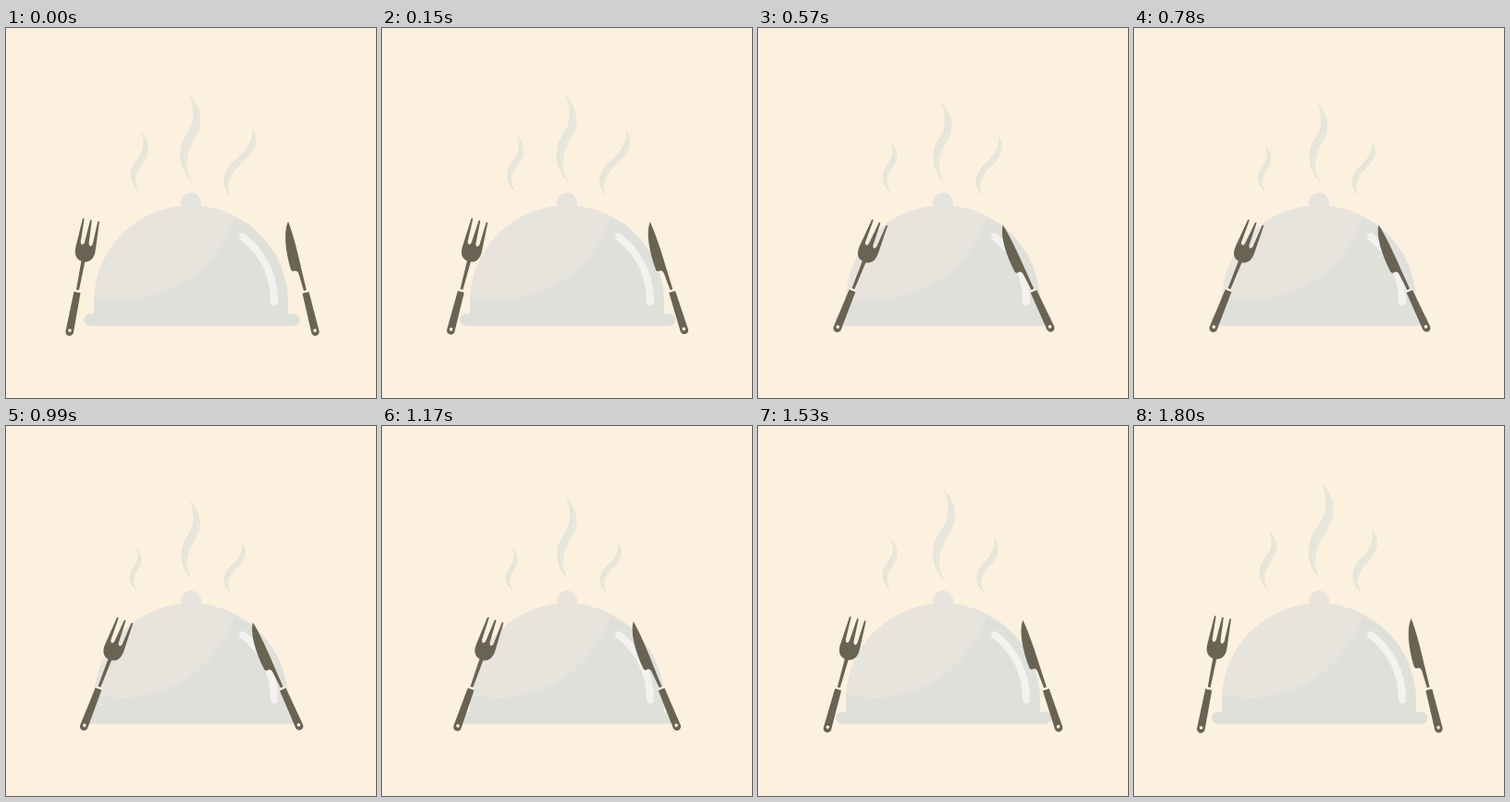
Recreate the animation shown at these times as an HTML page with a canvas. Size 400 by 400 pixels, loop 1860 ms.

```html
<!DOCTYPE html>
<html lang="en">
<head>
<meta charset="utf-8">
<title>Served dish</title>
<style>
  html, body { margin: 0; width: 100%; height: 100%; overflow: hidden; background: #fcf0df; }
  canvas { display: block; width: 400px; height: 400px; }
</style>
</head>
<body>
<canvas id="stage" width="400" height="400"></canvas>
<script>
const ctx = document.getElementById('stage').getContext('2d');
const LOOP = 1860, STEP = 30, LAST = 1800;
const CREAM = '#fcf0df', LIGHT = '#e7e4dd', GREY = '#e0e0db', SHINE = '#f3f2f0', STEEL = '#696354';
const KEYS = [0, 300, 570, 990, 1170, 1530, 1800];

// Smooth curve through one value per key time.
function curve(vals) {
  const n = KEYS.length;
  const slope = vals.map((_, i) => {
    const a = Math.max(i - 1, 0), b = Math.min(i + 1, n - 1);
    return (vals[b] - vals[a]) / (KEYS[b] - KEYS[a]);
  });
  return t => {
    let i = 0;
    while (i < n - 2 && t > KEYS[i + 1]) i++;
    const h = KEYS[i + 1] - KEYS[i], u = (t - KEYS[i]) / h, w = 1 - u;
    return w * w * (1 + 2 * u) * vals[i] + u * u * (3 - 2 * u) * vals[i + 1]
      + h * u * w * (w * slope[i] - u * slope[i + 1]);
  };
}

const tilt = curve([0, 7.15, 11, 10.25, 8.7, 4.6, 0.2]);
const forkShift = curve([0, 11, 17.3, 15.8, 13, 6.4, 3.6]);
const knifeShift = curve([0, 14.2, 18.4, 17.6, 15.8, 9.4, 5]);

const plumes = [
  { size: 0.0121, bow: -1.5, by: 178.5,
    bx: curve([145, 145, 144, 142, 142, 144, 146]),
    tx: curve([146, 144.5, 143, 140.5, 141, 143.5, 146]),
    ty: curve([113, 118, 123, 132, 132, 122, 113]) },
  { size: 0.01064, bow: 0, by: 166,
    bx: () => 201,
    tx: curve([197.5, 198, 197.5, 198, 198.5, 201, 203]),
    ty: curve([72, 74, 80, 80, 77, 69.5, 62]) },
  { size: 0.0132, bow: -4, by: 181.5,
    bx: curve([243, 243, 243.5, 244, 244, 246, 247]),
    tx: curve([266.5, 262, 260, 255, 255, 255, 257]),
    ty: curve([109, 114, 118, 126, 126, 120, 112]) }
];

// Plume edges from tip to foot: [sideways offset, height 0..1].
const TIP = [0, 1];
const leftEdge = [TIP, [7.9, .83], [4.3, .66], [-3.1, .553], [-12.5, .426], [-17.3, .19], [0, 0]];
const rightEdge = [TIP, [13, .87], [16.3, .66], [4.75, .5], [-2.7, .36], [-10.3, .21], [0, 0]];
const midEdge = leftEdge.map((p, i) => p.map((v, j) => (v + rightEdge[i][j]) / 2));

function plume(p, t) {
  const bx = p.bx(t), dx = p.tx(t) - bx, h = p.by - p.ty(t), k = p.size * h;
  const place = ([x, v]) => [bx + dx * v + k * x + p.bow * 4 * v * (1 - v), p.by - h * v];
  const trace = pts => {
    for (let i = 1; i < pts.length; i += 3) {
      ctx.bezierCurveTo(...pts[i], ...pts[i + 1], ...pts[i + 2]);
    }
  };
  const area = (a, b, color) => {
    ctx.beginPath();
    ctx.moveTo(...place(TIP));
    trace(a.map(place));
    trace(b.map(place).reverse());
    ctx.fillStyle = color;
    ctx.fill();
  };
  area(leftEdge, rightEdge, '#e5e5d9');
  area(midEdge, rightEdge, '#e9e7da');
}

function fill(path, color) {
  ctx.fillStyle = color;
  ctx.fill(path);
}

const dome = new Path2D('M95 310V297A105 105 0 0 1 305 297V310Z');
const tray = new Path2D('M90.5 309H311A6.5 6.5 0 0 1 311 322H90.5A6.5 6.5 0 0 1 90.5 309Z');
const glow = new Path2D('M256 226C277 242 290 266 290 296');

function disc(x, y, r) {
  const p = new Path2D();
  p.arc(x, y, r, 0, Math.PI * 2);
  return p;
}
const knob = disc(200, 189, 11), sheen = disc(125, 166, 128), hole = disc(0, 0, 1.8);

function dish() {
  fill(tray, GREY);
  fill(dome, GREY);
  ctx.save();
  ctx.clip(dome);
  fill(sheen, LIGHT);
  ctx.restore();
  fill(knob, LIGHT);
  ctx.strokeStyle = SHINE;
  ctx.lineWidth = 8;
  ctx.lineCap = 'round';
  ctx.stroke(glow);
}

// Cutlery is drawn upright with the handle hole at the origin.
const handle = new Path2D('M-3.6 -42.3H3.6L4.3 1.5A4.3 4.3 0 0 1 -4.3 1.5Z');
const fork = new Path2D('M-1.5 -44.5L-2 -76C-8 -77 -11.2 -82 -10.8 -90L-9.2 -121Q-8.3 -123 -7.4 -121'
  + 'L-6.6 -96Q-4.5 -91 -2.4 -96L-.9 -121Q0 -123 .9 -121L2.4 -96Q4.5 -91 6.6 -96L7.4 -121'
  + 'Q8.3 -123 9.2 -121L10.8 -90C11.2 -82 8 -77 2 -76L1.5 -44.5Z');
const knife = new Path2D('M0 -121.5Q2.4 -105 1.6 -66L1.5 -44.5H-1.5L-2.4 -64Q-3 -68 -6 -67.8'
  + 'Q-9 -67 -9.6 -70C-10.6 -92 -7.5 -112 0 -121.5Z');

function cutlery(shape, x, y, degrees) {
  ctx.save();
  ctx.translate(x, y);
  ctx.rotate(degrees * Math.PI / 180);
  fill(shape, STEEL);
  fill(handle, STEEL);
  ctx.fillStyle = CREAM;
  ctx.fillRect(-3.6, -44.3, 7.2, 2);
  fill(hole, CREAM);
  ctx.restore();
}

function draw(now) {
  const t = Math.min(Math.floor((now % LOOP) / STEP) * STEP, LAST);
  ctx.fillStyle = CREAM;
  ctx.fillRect(0, 0, 400, 400);
  plumes.forEach(p => plume(p, t));
  dish();
  const turn = tilt(t), f = forkShift(t), k = knifeShift(t);
  cutlery(fork, 69 + f, 327 - 0.22 * f, 10.9 + turn);
  cutlery(knife, 334 - k, 327 - 0.22 * k, -13.8 - turn);
}

let start;
function tick(now) {
  if (start === undefined) start = now;
  draw(now - start);
  requestAnimationFrame(tick);
}
draw(0);
requestAnimationFrame(tick);
</script>
</body>
</html>
```
